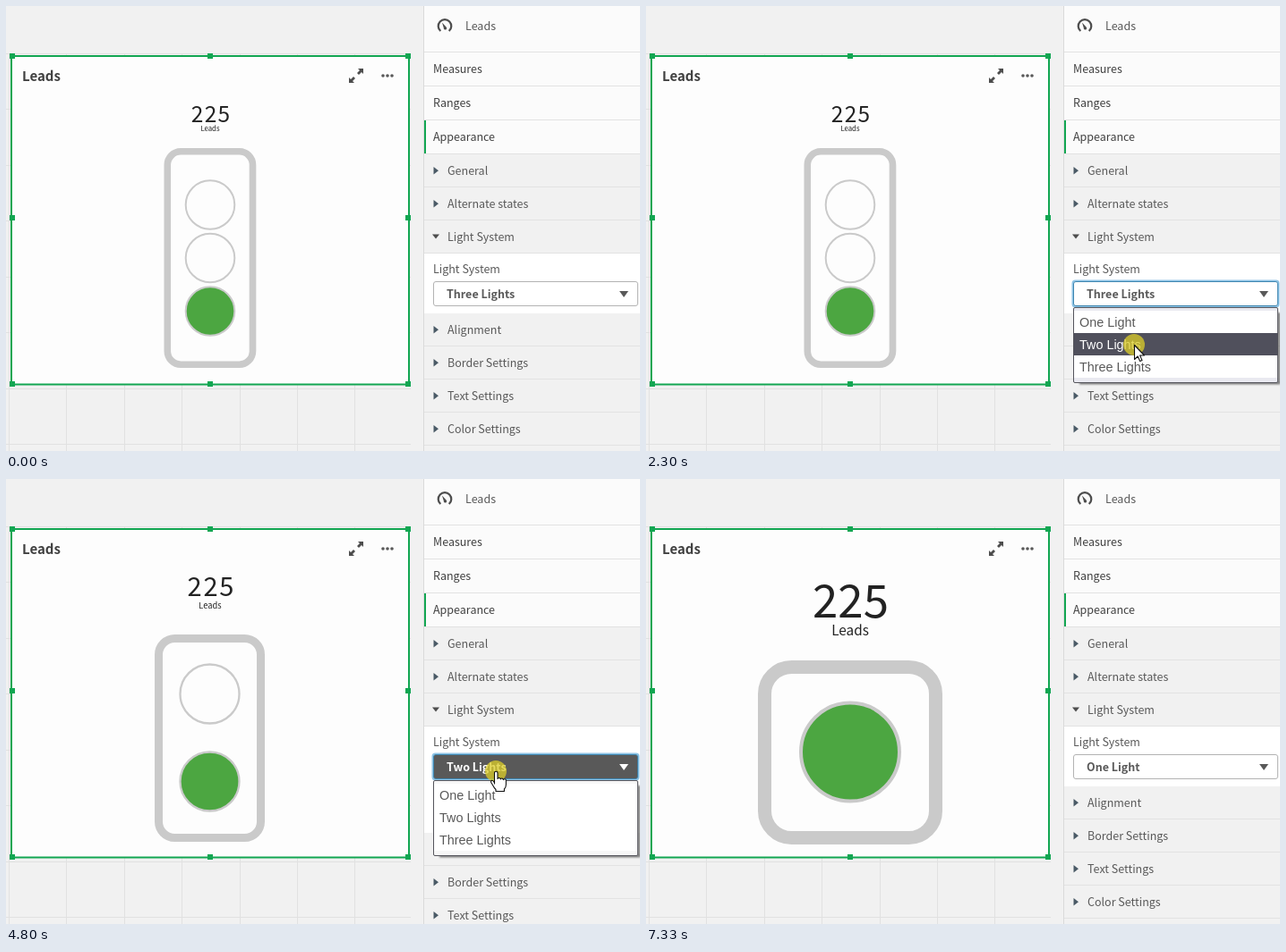
An HTML page for the animation above (8.17 s loop, 708 by 498 pixels).

```html
<!DOCTYPE html>
<html lang="en">
<head>
<meta charset="utf-8">
<title>Light system settings</title>
<style>
html, body { margin: 0; width: 100%; height: 100%; overflow: hidden; background: #f1f1f1; }
svg { display: block; }
text { font: 12.5px "Noto Sans CJK JP", "Noto Sans CJK SC", "Noto Sans CJK KR", "Noto Sans CJK TC", "Source Sans Pro", "Open Sans", sans-serif; fill: #595959; }
.dark { fill: #404040; }
.bold { font-weight: 700; }
.mid { text-anchor: middle; }
.list { font: 14.4px "Liberation Sans", Arial, sans-serif; }
.tip { font: 11.5px "Open Sans", sans-serif; }
</style>
</head>
<body>
<svg width="708" height="498" viewBox="0 0 708 498">
  <defs><filter id="soft" x="-10%" y="-10%" width="120%" height="120%"><feGaussianBlur stdDeviation=".8"/></filter></defs>
  <g id="base"></g>
  <g id="live"></g>
</svg>
<script>
const LOOP = 8170, GREEN = '#12a652', LINE = '#e2e2e2', RING = '#cacaca';
const names = ['One Light', 'Two Lights', 'Three Lights'];

const rect = (x, y, w, h, fill, more = '') => `<rect x="${x}" y="${y}" width="${w}" height="${h}" fill="${fill}" ${more}/>`;
const text = (x, y, s, cls = '', style = '') => `<text x="${x}" y="${y}" class="${cls}" style="${style}">${s}</text>`;
const path = (d, more) => `<path d="${d}" ${more}/>`;
const circle = (x, y, r, more) => `<circle cx="${x}" cy="${y}" r="${r}" ${more}/>`;

// Collapsed property section, 37 px high
const section = (y, name) => rect(467, y, 241, 37, '#f1f1f1') + rect(467, y + 36, 241, 1, LINE) +
  path(`M477.5 ${y + 14}l5.5 4.2-5.5 4.2z`, 'fill="#4a5a66"') + text(493, y + 23, name);

function base() {
  let s = '';
  for (let i = 0; i < 7; i++) s += rect(Math.round(3 + i * 64.4), 53, 1, 445, '#e1e1e1');
  for (let i = 0; i < 8; i++) s += rect(0, Math.round(52.5 + i * 62.5), 452, 1, '#e1e1e1');
  s += rect(6, 56, 444, 367.5, '#fdfdfd', `stroke="${GREEN}" stroke-width="2"`);
  for (const x of [7, 228, 449]) for (const y of [56, 237, 423])
    if (x !== 228 || y !== 237) s += rect(x - 3, y - 3, 6, 6, GREEN);
  s += text(18, 84, 'Leads', 'dark bold', 'font-size:15px');
  const head = 'M399 70v6l-2-2-3 3-2-2 3-3-2-2z';
  s += path(head, 'fill="#4d4d4d"') + path(head, 'fill="#4d4d4d" transform="rotate(180 391 78)"');
  for (const x of [421, 426, 431]) s += circle(x, 78, 1.8, 'fill="#595959"');

  s += rect(466, 0, 242, 498, '#fbfbfb') + rect(466, 0, 1, 498, '#dadada');
  s += path('M485.3 28A7.3 7.3 0 1 1 494.7 28', 'fill="none" stroke="#4d4d4d" stroke-width="2.2"') +
    path('M487 18.5L491.5 23.5A1.7 1.7 0 1 1 488.8 24.5Z', 'fill="#4d4d4d"') + text(513, 27, 'Leads');
  ['Measures', 'Ranges', 'Appearance'].forEach((n, i) => s += text(477, 75 + 38 * i, n, 'dark'));
  for (const y of [51, 89, 127, 165]) s += rect(467, y, 241, 1, LINE);
  s += rect(467, 128, 2, 37, GREEN);
  s += section(166, 'General') + section(203, 'Alternate states');
  s += rect(467, 240, 241, 37, '#f1f1f1') + rect(467, 276, 241, 1, LINE) +
    path('M476 255.5h8l-4 5z', 'fill="#4d4d4d"') + text(493, 263, 'Light System');
  return s;
}

// Gauge layouts: body [x, y, w, h, radius, stroke], lamps [x, r, stroke, ...y], figure and caption [size, baseline]
const gauges = [
  { body: [132.5, 210.5, 191, 191, 30, 15], lamps: [228, 55, 4, 305.5], num: [51, 154.5, 0], cap: [15.3, 175] },
  { body: [170.5, 178.5, 114, 223, 18, 9], lamps: [227.5, 33, 2.3, 240.5, 338.5], num: [29, 131, 1.8], cap: [9.3, 144.5] },
  { body: [180.3, 162.8, 95.2, 238.4, 15, 7.6], lamps: [228, 27.3, 2, 222.5, 282, 341.5], num: [24.5, 130, 1.3], cap: [7.8, 140] }
];

function gauge(n) {
  const { body: [x, y, w, h, r, k], lamps: [cx, lr, lk, ...ys], num, cap } = gauges[n - 1];
  let s = rect(x, y, w, h, 'none', `rx="${r}" stroke="${RING}" stroke-width="${k}"`);
  ys.forEach((cy, i) => s += circle(cx, cy, lr,
    `fill="${i === ys.length - 1 ? '#4ca641' : '#fdfdfd'}" stroke="${RING}" stroke-width="${lk}"`));
  return s + text(228.5 + num[2] / 2, num[1], '225', 'mid', `fill:#222;font-size:${num[0]}px;letter-spacing:${num[2]}px`) +
    text(228, cap[1], 'Leads', 'mid', `fill:#222;font-size:${cap[0]}px`);
}

const easeOut = p => 1 - (1 - p) ** 2, easeIn = p => p * p, easeBoth = p => p * p * (3 - 2 * p);
// [start, end, to x, to y, easing]
const moves = [
  [440, 1150, 578, 318, easeOut],
  [1850, 2250, 545, 379, easeBoth],
  [3970, 4690, 547, 327, easeBoth],
  [5060, 5270, 546, 347, easeBoth],
  [5850, 6130, 583, 428, easeBoth],
  [7020, 7330, 590, 500, easeIn]
];
function pointer(t) {
  let x = 618, y = 500;
  for (const [a, b, tx, ty, ease] of moves) {
    if (t < a) break;
    const p = ease(Math.min(1, (t - a) / (b - a)));
    x += (tx - x) * p;
    y += (ty - y) * p;
  }
  return [Math.round(x), Math.round(y)];
}

const HAND = 'M-1.5 14V2a1.75 1.75 0 0 1 3.5 0V8.5a1.7 1.7 0 0 1 3.2.5a1.7 1.7 0 0 1 3.2.6a1.6 1.6 0 0 1 3 1V15q0 3-2 5V22.5H0V20.5q-2-2-3.5-5L-5.3 12.5q-.5-2 1-2.2q1.2 0 2.8 2.6z';
const ARROW = 'M.5.5V16.5L4.2 13L6.7 18.6L9 17.6L6.6 12H11.5Z';

// Each use of the menu: list opens, pick is pressed, list closes, choice applies, focus ends
const uses = [[1570, 2300, 2400, 2430, 2540], [4800, 5440, 5510, 5540, 5620]];

function live(t) {
  const [x, y] = pointer(t);
  const n = 3 - uses.filter(u => t >= u[3]).length;
  const use = uses.find(u => t >= u[0] && t < u[4]);
  const age = use ? t - use[0] : 0;
  const open = use && t < use[2];
  const pressed = open && age < 60;
  const over = x > 477 && x < 706 && y >= 308 && y < 337;
  const top = n === 2 ? 396 : 344;

  let s = gauge(n) + rect(467, 277, 241, top - 277, '#fff') + text(477, 299, 'Light System');
  if (n === 2) s += text(477, 366, 'Yellow range is deactivated, when "Two') + text(477, 384, 'Lights" is selected.');
  ['Alignment', 'Border Settings', 'Text Settings', 'Color Settings', ''].forEach((name, i) => {
    if (top + 37 * i < 498) s += section(top + 37 * i, name);
  });

  if (use) s += rect(476.5, 307.5, 230, 29, 'none', 'rx="3" stroke="#8fc4e6" stroke-width="2"');
  const ink = pressed ? '#fff' : '#595959';
  s += rect(477.5, 308.5, 228, 27, pressed ? '#595959' : '#fff',
    `rx="2.5" stroke="${use ? '#3f86b0' : over ? '#595959' : '#b3b3b3'}"`) +
    text(492, 327, names[n - 1], 'bold', `fill:${ink}`) + path('M685 319h10l-5 7z', `fill="${ink}"`);

  if (use && t < use[3]) s += path('M484 422H707V343', 'fill="none" stroke="#666" stroke-width="2.4" filter="url(#soft)"');
  if (open) {
    const lit = y > 341 ? Math.floor((y - 341) / 25) : age < 60 ? -1 : n - 1;
    s += rect(477.5, 337.5, 228, 84, age < 60 ? '#f7f7f7' : '#e9e9f0', 'rx="1.5" stroke="#55555c"');
    names.forEach((name, i) => s += rect(478, 341 + 25 * i, 227, 25, i === lit ? '#50505c' : '#fff') +
      text(484, 359 + 25 * i, name, 'list', i === lit ? 'fill:#fff' : ''));
  }

  if (t >= 6670 && t < 7020) s += rect(583.5, 449.5, 79, 21, '#fff', 'stroke="#767676"') + text(588, 464, 'Text Settings', 'tip');

  if (open && (age < 100 || t >= use[1])) s += circle(x, y, 12, 'fill="#dccd28" fill-opacity=".75"');
  if (t >= 440 && t < 7330) {
    const hand = over || (!open && y >= top);
    s += path(hand ? HAND : ARROW, `transform="translate(${x} ${y})" fill="#fff" stroke="#111" stroke-width="1.1" stroke-linejoin="round"`);
  }
  return s;
}

const layer = document.getElementById('live');
document.getElementById('base').innerHTML = base();
const start = performance.now();
let shown = '';
function draw() {
  const next = live((performance.now() - start) % LOOP);
  if (next !== shown) layer.innerHTML = shown = next;
  requestAnimationFrame(draw);
}
draw();
</script>
</body>
</html>
```
